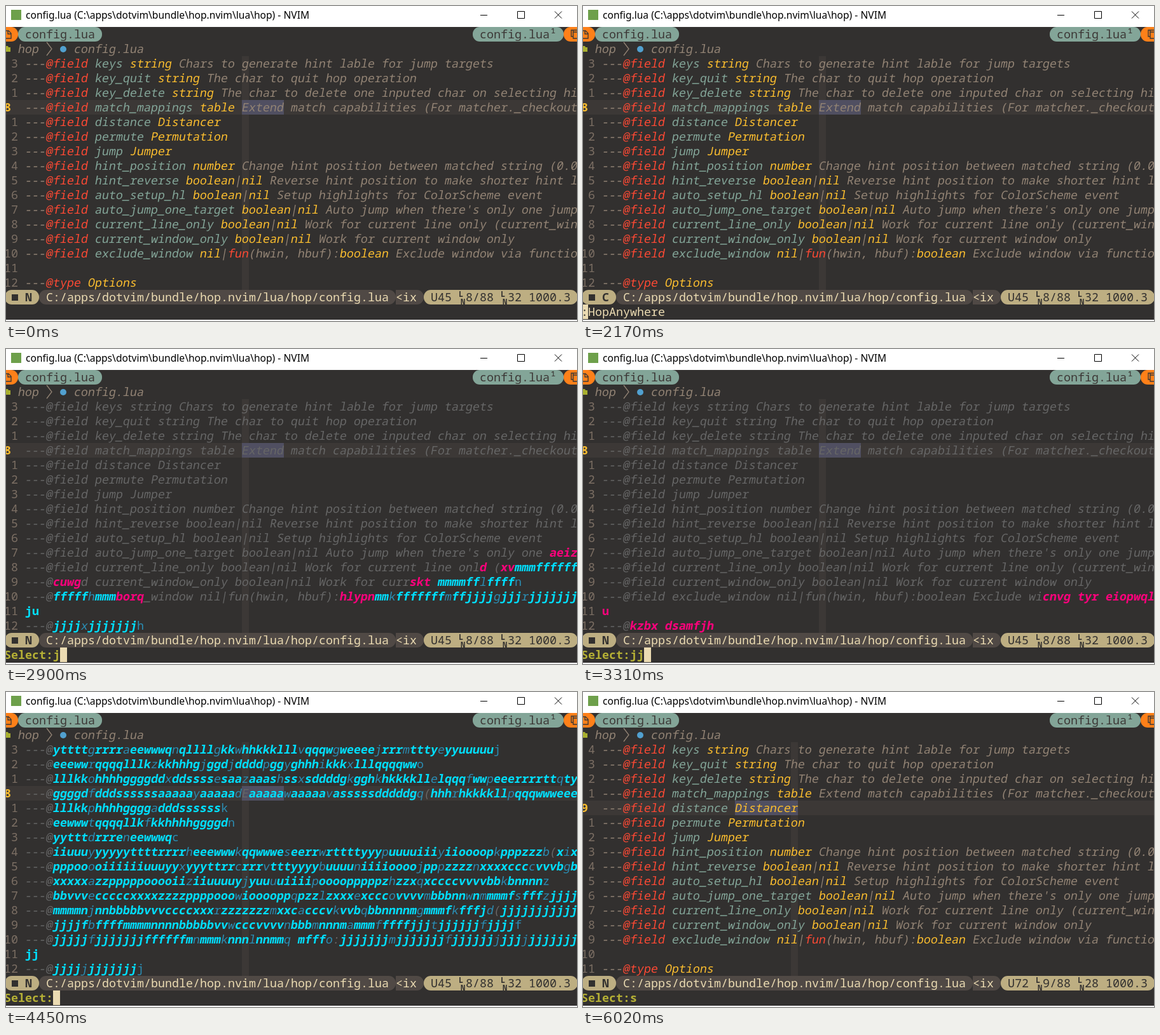
Animation, 898 px wide and 496 px high, one loop 6.43 s. Source, as an HTML page with a canvas:

```html
<!DOCTYPE html>
<html lang="en">
<head>
<meta charset="utf-8">
<title>Hop in the editor</title>
<style>
html, body { margin: 0; width: 100%; height: 100%; overflow: hidden; background: #32302f; }
canvas { display: block; }
</style>
</head>
<body>
<canvas id="stage" width="898" height="496"></canvas>
<script>
const g = document.getElementById("stage").getContext("2d");
const LOOP = 6430, CW = 11, RH = 23, TOP = 79, TEXT_COL = 3, SLANT = 0.18;
const MONO = '18.33px "Noto Sans Mono", "DejaVu Sans Mono", monospace';
const C = {
  bg: "#32302f", line: "#3c3836", word: "#504f61", note: "#928374", num: "#7c6f64",
  red: "#fb4934", name: "#83a598", type: "#fabd2f", dim: "#666666", cream: "#ebdbb2",
  tan: "#bdae82", grey: "#504945", orange: "#fe8019", prompt: "#b5b035",
  first: "#00dfff", second: "#2b8db3", last: "#ff007c"
};

// Each line is a list of [text, colour] spans.
const field = (name, type, note = "") => [
  ["---", C.note], ["@field", C.red], [" " + name + " ", C.name],
  ...type.match(/fun|\w+|\W/g).map(t =>
    [t, t === "fun" ? C.red : /^(\W|hwin|hbuf)$/.test(t) ? C.note : C.type]),
  [note && " " + note, C.note]
];
const lines = [
  field("keys", "string", "Chars to generate hint lable for jump targets"),
  field("key_quit", "string", "The char to quit hop operation"),
  field("key_delete", "string", "The char to delete one inputed char on selecting hi"),
  field("match_mappings", "table", "Extend match capabilities (For matcher._checkout"),
  field("distance", "Distancer"),
  field("permute", "Permutation"),
  field("jump", "Jumper"),
  field("hint_position", "number", "Change hint position between matched string (0.0"),
  field("hint_reverse", "boolean|nil", "Reverse hint position to make shorter hint l"),
  field("auto_setup_hl", "boolean|nil", "Setup highlights for ColorScheme event"),
  field("auto_jump_one_target", "boolean|nil", "Auto jump when there's only one jump"),
  field("current_line_only", "boolean|nil", "Work for current line only (current_win"),
  field("current_window_only", "boolean|nil", "Work for current window only"),
  field("exclude_window", "nil|fun(hwin, hbuf):boolean", "Exclude window via functio"),
  [],
  [["---", C.note], ["@type", C.red], [" Options", C.type]]
];
const plain = lines.map(spans => spans.map(s => s[0]).join(""));

// Hints are [row, column, keys]; capitals mark the last key, blanks leave the text visible.
const allHints = [
  "yttttgrrrraeewwwqnqllllgkkwhhkkklllvqqqwgweeeejrrrmtttyeyyuuuuuj",
  "eeewwrqqqqlllkzkkhhhgjggdjddddpggyghhhikkkxlllqqqqwwo",
  "lllkkohhhhggggddxddssssesaazaaashssxsddddgkgghkhkkkkllelqqqfwwpeeerrrrttqty",
  "ggggdfdddssssssaaaaayaaaaad aaaaawaaaaavasssssdddddgq hhhrhkkkkllpqqqwwweee",
  "lllkkphhhhggggadddssssssk",
  "eewwwtqqqqllkfkkhhhhggggdn",
  "yytttdrrreneewwwqc",
  "iiuuuyyyyyyttttrrrrheeewwwkqqwwweseerrwrttttyyypuuuuiiiyiioooopkpppzzzb xix",
  "pppooooiiiiiiuuuyyxyyyttrrcrrrvtttyyyybuuuuniiiioooojpppzzzznxxxxccccvvvbgb",
  "xxxxxazzpppppooooiiziiuuuuyjyuuuuiiiipoooopppppzhzzxqxccccvvvvbbkbnnnnz",
  "bbvvvecccccxxxxzzzzppppooowiooooppqpzzlzxxxexcccovvvvmbbbnnwnmmmmfsfffzjjjj",
  "mmmmnjnnbbbbbvvvccccxxxrzzzzzzzmxxcacccvkvvbqbbnnnnmgmmmfkfffjd jjjjjjjjjjj",
  "jjjjfbffffmmmmnnnnbbbbbvvwcccvvvvnbbbmnnnmammmfffffjjjtjjjjjjfjjjjf",
  "jjjjjfjjjjjjjffffffmnmmmknnnlnnmmq mfffo jjjjjjjmjjjjjjjfjjjjjjjjjjjjjjjjjj",
  "jj",
  "jjjjjjjjjjjjj"
].map((keys, row) => [row, row === 14 ? 0 : 4, keys]);
const jHints = [
  [10, 75, "AEIZ"], [11, 65, "D"], [11, 68, "XVmmmffffff"],
  [12, 4, "CUWG"], [12, 55, "SKT"], [12, 59, "mmmmfflffffn"],
  [13, 4, "fffffhmmmBORQ"], [13, 45, "HLYPNmmkfffffffmffjjjjgjjjrjjjjjjj"],
  [14, 0, "ju"], [15, 4, "jjjjxjjjjjjjh"]
];
const jjHints = [
  [13, 63, "CNVG"], [13, 68, "TYR"], [13, 72, "EIOPWQL"],
  [14, 0, "U"], [15, 4, "KZBX"], [15, 9, "DSAMFJH"]
];
const sHints = [
  [2, 23, "VCYE A"], [2, 35, "H RX J"], [3, 13, "BPTQGS"], [3, 45, "DWIZN"], [4, 22, "FMOULK"]
];

const before = { row: 3, col: 31, word: [31, 6], pos: "U45", colNo: 32 };
const after = { row: 4, col: 27, word: [19, 9], pos: "U72", colNo: 28, cmd: "Select:s" };
const command = (cmd, cmdCursor) => ({ ...before, cmd, cmdCursor, mode: "C" });
const select = (keys, hints) =>
  ({ ...before, cmd: "Select:" + keys, cmdCursor: 7 + keys.length, hints });
const steps = [
  [0, before],
  [300, { ...before, block: true }],
  [550, command(":", 1)],
  [1380, command(":HopAnywhere", 12)],
  [2170, command(":HopAnywhere", 0)],
  [2200, select("", allHints)],
  [2870, select("j", jHints)],
  [3310, select("jj", jjHints)],
  [4030, select("j", jHints)],
  [4450, select("", allHints)],
  [4940, select("s", sHints)],
  [5370, { ...after, block: true }],
  [6020, after]
];

const cellX = col => col * CW - 3;
const rowY = row => TOP + row * RH;

function rect(x, y, w, h, color) {
  g.fillStyle = color;
  g.fillRect(x, y, w, h);
}
function write(text, col, y, color, { bold, italic } = {}) {
  const slant = italic ? SLANT : 0;
  g.font = (bold ? "bold " : "") + MONO;
  g.fillStyle = color;
  [...text].forEach((ch, i) => {
    // Lean about the middle of the small letters so that each stays in its cell.
    g.setTransform(1, 0, -slant, 1, cellX(col + i) - slant * 5, y + 18);
    g.fillText(ch, 0, 0);
  });
  g.resetTransform();
}
function pill(x0, x1, y, color, left = 11, right = 11) {
  g.fillStyle = color;
  g.beginPath();
  g.roundRect(x0, y, x1 - x0, RH, [left, right, right, left]);
  g.fill();
}
function dot(x, y, r, color) {
  g.fillStyle = color;
  g.beginPath();
  g.arc(x, y, r, 0, 7);
  g.fill();
}
function stroke(path, color, width = 1) {
  g.strokeStyle = color;
  g.lineWidth = width;
  g.stroke(new Path2D(path));
}

function drawTop() {
  rect(0, 0, 898, 33, "#fff");
  rect(8, 6, 16, 16, "#6ea04b");
  g.font = '15.6px "Noto Sans", "Open Sans", sans-serif';
  g.fillStyle = "#000";
  g.fillText("config.lua (C:\\apps\\dotvim\\bundle\\hop.nvim\\lua\\hop) - NVIM", 31, 20);
  stroke("M746 14.5h11M804.5 8.5h11v11h-11zM863 8.5l11 11M874 8.5l-11 11", "#000");

  pill(-20, 19, 33, C.orange);
  stroke("M-2 39h6l4 4v8H-2M3 39v5h5", C.line, 1.4);
  pill(19, 151, 33, C.name);
  write("config.lua", 3, 33, C.line);
  pill(734, 877, 33, C.name);
  write("config.lua¹", 68, 33, C.line);
  pill(877, 920, 33, C.orange);
  stroke("M892 41v-3h9M892 41h9v10h-9zM892 48h-3v-10h3", C.line, 1.4);

  g.fillStyle = "#a9b02f";
  g.fill(new Path2D("M0 63h3l1 2h3v7h-7z"));
  write("hop", 2, 56, C.note, { italic: true });
  stroke("M64 57l8 10.5l-8 10.5", C.note, 1.3);
  dot(90, 68, 5, "#51a0cf");
  write("config.lua", 10, 56, C.note, { italic: true });
}

function drawHint(row, col, keys) {
  const line = plain[row];
  [...keys].forEach((key, i) => {
    if (key === " ") return;
    const at = col + i, isLast = key < "a";
    const isFirst = !line || /\w/.test(line[at] || "");
    const color = isLast ? C.last : isFirst ? C.first : C.second;
    write(key.toLowerCase(), at + TEXT_COL, rowY(row), color,
      { italic: at < line.length, bold: isLast || isFirst });
  });
}

function drawText(s) {
  rect(0, rowY(s.row), 898, RH, C.line);
  rect(cellX(s.col + TEXT_COL), TOP, CW, 16 * RH, C.line);
  rect(cellX(s.word[0] + TEXT_COL), rowY(s.row), s.word[1] * CW, RH, C.word);

  // Cells under a hint or the block cursor are not drawn with the base text.
  const covered = new Set();
  for (const [row, col, keys] of s.hints || [])
    [...keys].forEach((k, i) => k !== " " && covered.add(row * 100 + col + i));
  if (s.block) covered.add(s.row * 100 + s.col);

  lines.forEach((spans, row) => {
    const y = rowY(row), away = Math.abs(row - s.row);
    if (away) write(String(away).padStart(2), 0, y, C.num);
    else write(String(row + 5), 0, y, C.type, { bold: true });
    let col = 0;
    for (const [text, color] of spans)
      for (const ch of text) {
        if (!covered.has(row * 100 + col))
          write(ch, col + TEXT_COL, y, s.hints ? C.dim : color, { italic: true });
        col++;
      }
  });
  for (const hint of s.hints || []) drawHint(...hint);
  if (s.block) {
    rect(cellX(s.col + TEXT_COL), rowY(s.row), CW, RH, C.cream);
    write(plain[s.row][s.col], s.col + TEXT_COL, rowY(s.row), C.bg, { italic: true });
  }
}

function lineMark(col, y) {
  g.font = 'bold 12px "Noto Sans Mono", monospace';
  g.fillStyle = C.bg;
  g.fillText("L", cellX(col), y + 11);
  g.fillText("N", cellX(col) + 3, y + 23);
}

function drawStatus(s) {
  const y = rowY(16);
  pill(-2, 52, y, C.tan);
  rect(9, y + 7, 10, 10, C.bg);
  write(s.mode || "N", 3, y, C.bg, { bold: true });
  pill(52, 613, y, C.grey);
  write("C:/apps/dotvim/bundle/hop.nvim/lua/hop/config.lua", 6, y, C.cream);
  pill(613, 657, y, C.grey, 0);
  write("<ix", 56, y, C.cream);
  pill(657, 899, y, C.tan);
  write(s.pos, 61, y, C.bg);
  lineMark(65, y);
  write(s.row + 5 + "/88", 66, y, C.bg);
  lineMark(71, y);
  write(s.colNo + " 1000.3", 72, y, C.bg);
}

function drawCommand(s) {
  const y = rowY(17), cmd = s.cmd || "", at = s.cmdCursor;
  if (cmd[0] === "S") write(cmd, 0, y, C.prompt, { bold: true });
  else write(cmd, 0, y, C.cream);
  if (at !== undefined) {
    rect(cellX(at), y, CW, RH, C.cream);
    write(cmd[at] || "", at, y, C.bg);
  }
  rect(0, 494, 898, 2, "#fff");
}

function frame(now) {
  const t = now % LOOP;
  const state = steps.findLast(step => step[0] <= t)[1];
  rect(0, 0, 898, 496, C.bg);
  drawTop();
  drawText(state);
  drawStatus(state);
  drawCommand(state);
}
const start = performance.now();
function tick() {
  frame(performance.now() - start);
  requestAnimationFrame(tick);
}
tick();
</script>
</body>
</html>
```
